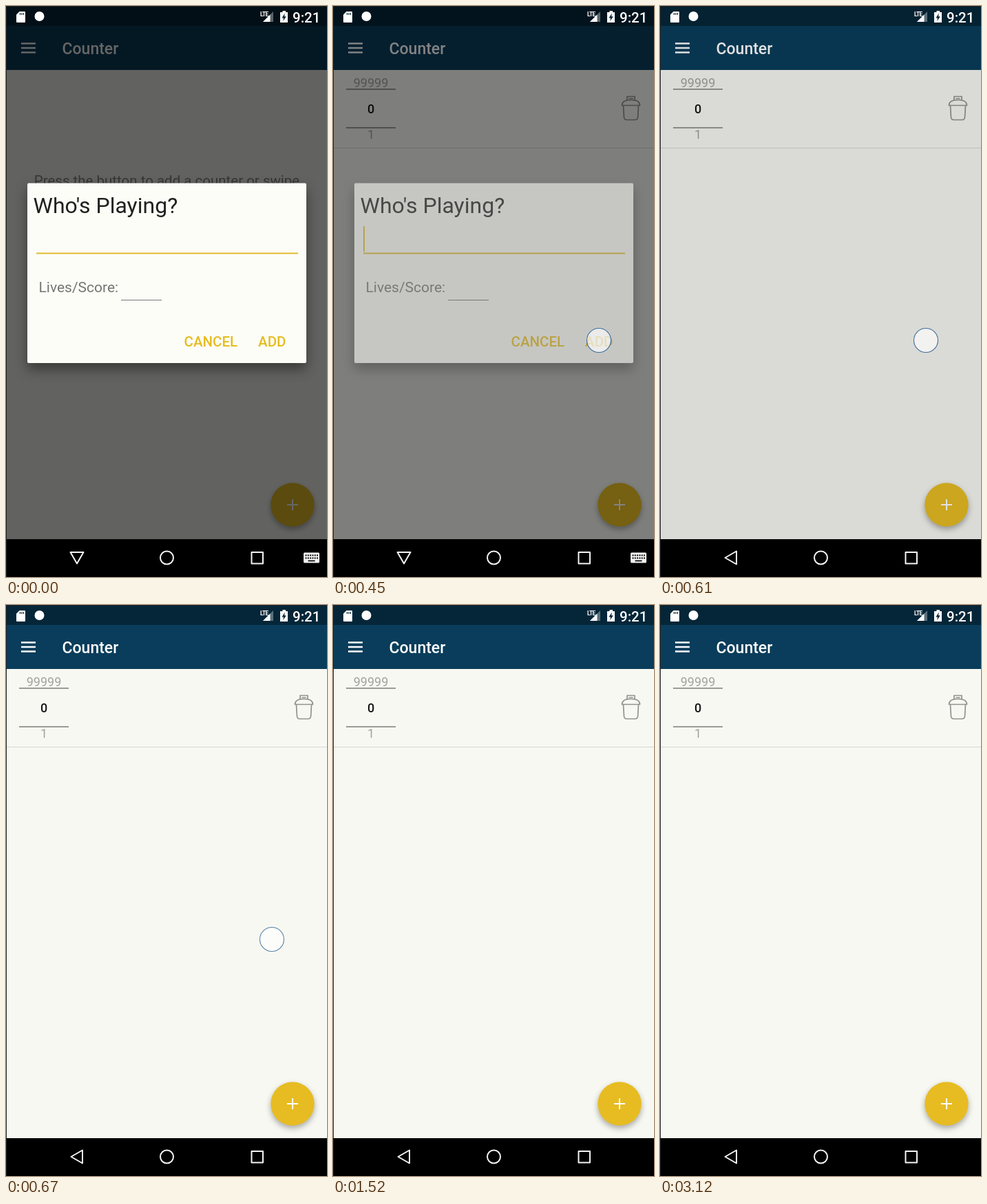
An HTML page for the animation above (3.18 s loop, 466x830 px).

```html
<!DOCTYPE html>
<html lang="en">
<head>
<meta charset="utf-8">
<title>Counter</title>
<style>
  html, body { margin: 0; width: 100%; height: 100%; overflow: hidden; background: #000; }
  svg { display: block; width: 100vw; height: 100vh; }
  text { font-family: Roboto, sans-serif; white-space: pre; }
  .medium { font-weight: 500; }
  .line { fill: none; stroke-linejoin: round; stroke-linecap: round; }
  #dialog rect { filter: drop-shadow(0 9px 9px rgba(0, 0, 0, .42)); }
  #fab circle { filter: drop-shadow(0 4px 4px rgba(0, 0, 0, .32)); }
</style>
</head>
<body>
<svg viewBox="0 0 466 830">
  <!-- app -->
  <rect width="466" height="775" fill="#f7f8f2"/>
  <rect width="466" height="93" fill="#093d5b"/>
  <rect width="466" height="29" fill="#042638"/>
  <path d="M22 54.5H43M22 61H43M22 67.5H43" stroke="#fff" stroke-width="2.3"/>
  <text class="medium" x="81.5" y="69.5" font-size="23" fill="#fff">Counter</text>

  <text id="hint" x="233.5" y="261" font-size="20.5" text-anchor="middle" fill="#858581">Press the button to add a counter or swipe</text>

  <g id="row">
    <g font-size="18" text-anchor="middle" fill="#a2a39e">
      <text x="55" y="118">99999</text>
      <text class="medium" x="55" y="156" fill="#161616">0</text>
      <text x="55" y="193">1</text>
    </g>
    <path d="M19 121H91M19 177H91" stroke="#9b9c97" stroke-width="2"/>
    <path d="M0 206.5H466" stroke="#d6d7d2"/>
    <g class="line" stroke="#92938e" stroke-width="1.7">
      <path d="M419.5 144.5C419.5 139 424 136.5 432.5 136.5S445.5 139 445.5 144.5Z"/>
      <path d="M427 136.5V131.5H438V136.5M430 134.5H435"/>
      <path d="M421.5 145L422.5 162Q423 165.500 426.500 165.500H438.500Q442 165.500 442.500 162L443.500 145"/>
    </g>
  </g>

  <g id="fab">
    <circle cx="416" cy="725" r="31.7" fill="#e7bc22"/>
    <path d="M408 725H424M416 717V733" stroke="#fff" stroke-width="2"/>
  </g>
  <rect id="dim" width="466" height="775"/>

  <!-- status icons -->
  <g fill="#fff">
    <path d="M19.500 8H27Q28 8 28 9V23Q28 24 27 24H16Q15 24 15 23V12.500Z"/>
    <path d="M20.500 10V13M23 10V13M25.500 10V13" stroke="#042638" stroke-width="1.2"/>
    <circle cx="48.500" cy="15" r="7"/>
    <text x="369" y="15" font-size="8.300" font-weight="700" letter-spacing="-.7">LTE</text>
    <path d="M388 8V23H373Z" fill-opacity=".35"/>
    <path d="M383.500 12.500V23H373Z"/>
    <path d="M401.500 7H406V9H409V24H398V9H401.500Z"/>
    <path d="M404.800 10.500L400.500 17.500H403L402.300 22L406.800 15.300H404.200Z" fill="#042638"/>
    <text class="medium" x="416" y="23.500" font-size="20.500">9:21</text>
  </g>

  <!-- navigation bar -->
  <rect y="775" width="466" height="55"/>
  <g class="line" stroke="#f4f4f4" stroke-width="2">
    <path id="back" d="M94.500 802L111 792.500V811.500Z"/>
    <path id="hideKeys" d="M93.500 794H112.500L103 810.500Z"/>
    <circle cx="233.500" cy="802" r="9.500"/>
    <path d="M356.500 794H373V810.500H356.500Z"/>
  </g>
  <g id="keyboard">
    <rect x="432" y="794.500" width="23" height="15" rx="1.500" fill="#f4f4f4"/>
    <path d="M434.500 798.500H453M434.500 802.500H453" stroke="#000" stroke-width="2" stroke-dasharray="2 1.300"/>
    <path d="M438.500 806.500H448.500" stroke="#000" stroke-width="1.700"/>
  </g>

  <g id="dialog">
    <rect x="31" y="257.500" width="405" height="261.500" rx="2" fill="#fcfdf7"/>
    <text x="39.500" y="300.500" font-size="32" fill="#202020">Who's Playing?</text>
    <path d="M44 359.500H424" stroke="#e2b92f" stroke-width="2"/>
    <path id="cursor" d="M45 320V357" stroke="#e2b92f" stroke-width="2"/>
    <text x="47.500" y="416" font-size="21" fill="#757572">Lives/Score:</text>
    <path d="M167 427.500H226" stroke="#777"/>
    <g class="medium" font-size="20.500" fill="#e7bc22">
      <text x="258.500" y="495">CANCEL</text>
      <text x="366" y="495">ADD</text>
    </g>
  </g>

  <circle id="touch" cx="386" cy="486" r="17.500" fill="#fff" fill-opacity=".65" stroke="#3d6d9c" stroke-width="1.100"/>
  <path d="M.5 0V830M0 .5H466" stroke="#1d2022"/>
</svg>
<script>
  const LOOP = 3180, ROW_ADDED = 390, KEYS_HIDDEN = 530;
  // Points are [time, opacity].
  const FADES = {
    dim: [[390, .6], [450, .49], [550, .39], [610, .12], [670, 0]],
    dialog: [[390, 1], [450, .58], [550, .22], [600, 0]],
    touch: [[90, 0], [210, 1], [640, 1], [850, 0]]
  };
  const el = id => document.getElementById(id);
  const show = (id, visible) => el(id).style.visibility = visible ? "visible" : "hidden";

  function sample(points, t) {
    const next = points.findIndex(p => p[0] > t);
    if (next === 0) return points[0][1];
    if (next < 0) return points.at(-1)[1];
    const [t0, a] = points[next - 1], [t1, b] = points[next];
    return a + (b - a) * (t - t0) / (t1 - t0);
  }

  function draw(t) {
    for (const id in FADES) el(id).style.opacity = sample(FADES[id], t);
    show("cursor", t >= 120);
    show("hint", t < ROW_ADDED);
    show("row", t >= ROW_ADDED);
    show("back", t >= KEYS_HIDDEN);
    show("hideKeys", t < KEYS_HIDDEN);
    show("keyboard", t < KEYS_HIDDEN);
  }

  const start = performance.now();
  function tick() {
    draw((performance.now() - start) % LOOP);
    requestAnimationFrame(tick);
  }
  tick();
</script>
</body>
</html>
```
